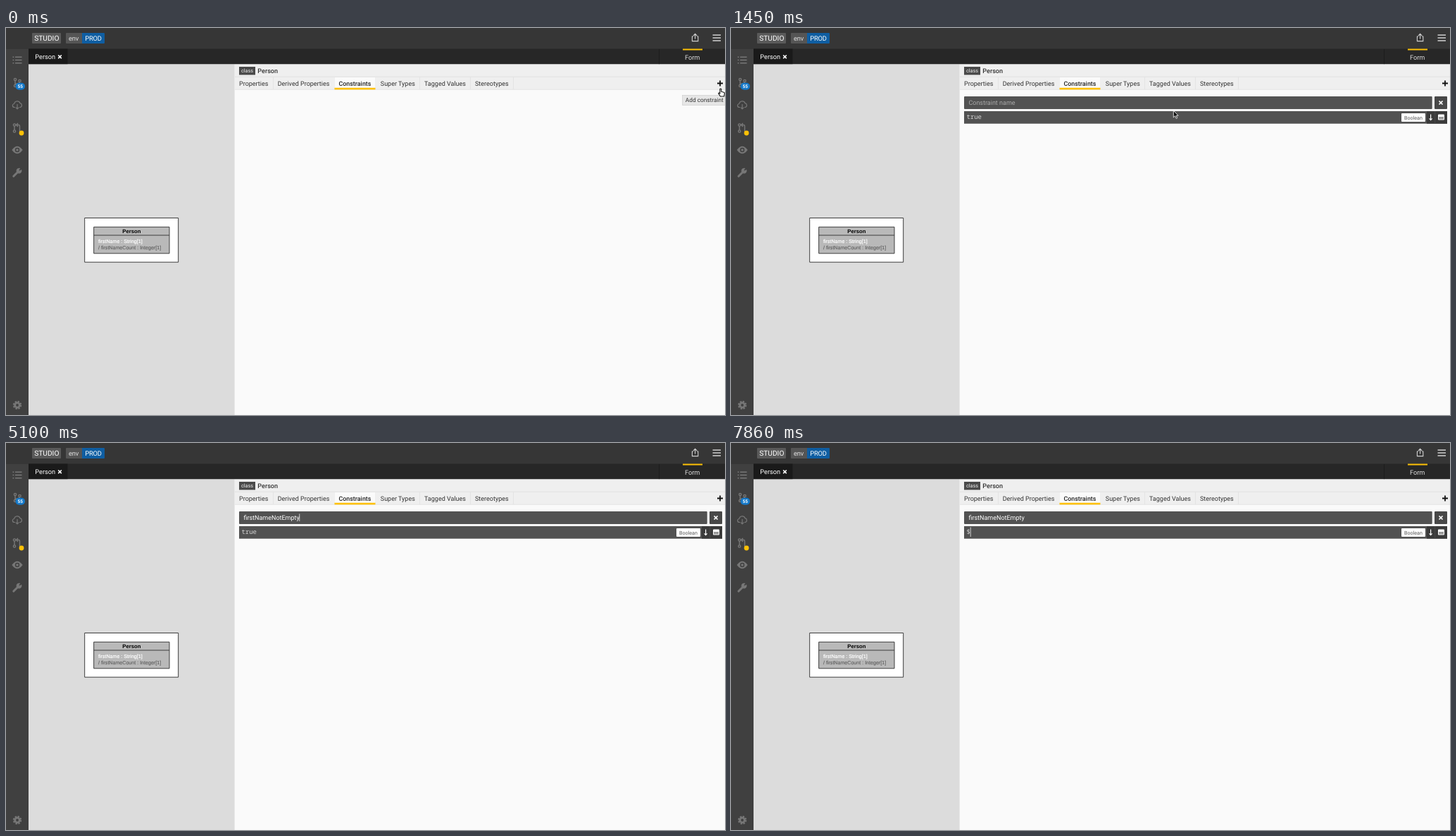
These frames come from a looping animation (1021x549 px, 8 s). An HTML page:

```html
<!DOCTYPE html>
<html lang="en">
<head>
<meta charset="utf-8">
<title>Model editor</title>
<style>
  html, body { margin: 0; width: 100%; height: 100%; overflow: hidden; background: #fafafa; }
  svg { display: block; font: 9px Roboto, sans-serif; text-rendering: geometricPrecision; }
  .medium { font-weight: 500; }
  .uml { font: 7.1px "Liberation Sans", Arial, sans-serif; stroke-width: .2; }
  .code { font: 9px "Noto Sans Mono", monospace; fill: #d4d4d4; }
  .line { fill: none; stroke: #777; stroke-width: 1.4; }
</style>
</head>
<body>
<svg width="1021" height="549" viewBox="0 0 1021 549">
  <!-- window bars -->
  <rect width="1021" height="30" fill="#363636"/>
  <rect x="32" y="29.5" width="989" height="22" fill="#272727"/>
  <rect x="32" y="29.5" width="55.5" height="22" fill="#1a1a1a"/>
  <path d="M927.5 30V51.5" stroke="#1c1c1c"/>
  <rect y="30" width="32" height="519" fill="#404040"/>
  <rect x="961" y="29.5" width="28" height="2" fill="#ffc107"/>
  <rect x="37" y="7" width="41" height="15" rx="1" fill="#5a5a5a"/>
  <path d="M86 7H108V22H86a1 1 0 0 1-1-1V8a1 1 0 0 1 1-1" fill="#555"/>
  <path d="M108 7H139a1 1 0 0 1 1 1V21a1 1 0 0 1-1 1H108z" fill="#0f5ea2"/>
  <g fill="#fff">
    <text x="40.2" y="18.2" font-size="10.2">STUDIO</text>
    <g font-size="9.4" letter-spacing="-.25">
      <text x="89" y="18" fill="#ddd">env</text>
      <text x="112.3" y="18">PROD</text>
    </g>
    <text x="41.3" y="44" font-size="9.2">Person</text>
    <text x="964" y="44.8" font-size="9.2" fill="#ddd">Form</text>
  </g>
  <path d="M74.2 38.5l4.6 4.6m0-4.6l-4.6 4.6" stroke="#fff" stroke-width="1.6"/>
  <g class="line" style="stroke:#d0d0d0">
    <path d="M976 12H974.4V18.6H982.8V12H981.2M978.6 15.5V8.5M976 11l2.6-2.7 2.6 2.7" stroke-width="1.1"/>
    <path d="M1003.5 10h11.5m-11.5 4h11.5m-11.5 4h11.5" stroke-width="1.7"/>
  </g>

  <!-- sidebar icons -->
  <g class="line">
    <path d="M13 41.3h9.5M13 45.5h9.5M13 49.7h9.5M9.5 41.3h1.8M9.5 45.5h1.8M9.5 49.7h1.8"/>
    <circle cx="13" cy="73" r="1.6"/><circle cx="19.5" cy="75" r="1.6"/><circle cx="13" cy="82" r="1.6"/>
    <path d="M13 74.5V80.5M19.5 76.5q0 2-6.5 3"/>
    <path d="M13 112.5H12a2.5 2.5 0 0 1-.3-5 4.3 4.3 0 0 1 8.3-.8 3 3 0 0 1 .3 5.8H19M16 108V115M13.8 112.7l2.2 2.3 2.2-2.3" stroke-width="1.2"/>
    <circle cx="12" cy="137.5" r="1.6"/><circle cx="12" cy="146.5" r="1.6"/>
    <path d="M12 139V145M15 137.5H18q1.5 0 1.5 2V147M17 135l-2.5 2.5 2.5 2.5"/>
    <path d="M9.3 173q6.7-9 13.4 0q-6.7 9-13.4 0z" fill="#777"/>
    <circle cx="16" cy="173" r="2.5" fill="#777" stroke="#404040"/>
    <path d="M10.8 210.3l6-6" stroke-width="3" stroke-linecap="round"/>
    <path d="M21.6 201.8a3.2 3.2 0 1 1-2.5-2.3l-1.6 2 1.8 1.8z" fill="#777"/>
    <circle cx="16" cy="535" r="5.2" stroke-dasharray="2.4 1.68" stroke-width="2"/>
    <circle cx="16" cy="535" r="3.3" stroke-width="2.8"/>
  </g>
  <rect x="13.5" y="77.8" width="13.5" height="10" rx="5" fill="#1478c8"/>
  <text x="20.2" y="85.3" font-size="6.5" font-weight="700" text-anchor="middle" fill="#fff">55</text>
  <circle cx="22" cy="149" r="3.4" fill="#ffc107"/>

  <!-- diagram -->
  <rect x="32" y="51.5" width="292" height="497.5" fill="#dcdcdc"/>
  <path d="M324.5 51.5V549" stroke="#e8e8e8"/>
  <g stroke="#3c3c3c">
    <path d="M111.7 269.5H244.7V332.2H111.7z" fill="#fff"/>
    <path d="M124.7 282.3H232V319.8H124.7zM124.7 294H232" fill="#b9b9b9"/>
  </g>
  <g class="uml">
    <text x="178.3" y="291.3" font-size="7.7" font-weight="700" text-anchor="middle">Person</text>
    <text x="131" y="304.5" fill="#fff" stroke="#fff">firstName : String[1]</text>
    <text x="131" y="313.5" fill="#686868" stroke="#686868">/ firstNameCount : Integer[1]</text>
  </g>

  <!-- form header -->
  <rect x="325" y="51.5" width="696" height="35.5" fill="#efefef"/>
  <path d="M325 69.2H1021M325 87.2H1021" stroke="#dedede" stroke-width=".8"/>
  <path d="M379.5 70V87M466.5 70V87M524.5 70V87M587.5 70V87M659.5 70V87M720.5 70V87" stroke="#e4e4e4"/>
  <rect x="466.5" y="70" width="58" height="17" fill="#fafafa"/>
  <rect x="466.5" y="84.8" width="58" height="2.6" fill="#ffc107"/>
  <rect x="331" y="55" width="23" height="11.5" fill="#4a4a4a"/>
  <text x="334" y="63.2" font-size="7.2" fill="#eee">class</text>
  <g fill="#333">
    <text class="medium" x="357.3" y="63.6" font-size="9.1">Person</text>
    <text x="331" y="81.6">Properties</text>
    <text x="385.7" y="81.6">Derived Properties</text>
    <text class="medium" x="472.5" y="81.6" font-size="8.9" fill="#222">Constraints</text>
    <text x="531.8" y="81.6">Super Types</text>
    <text x="594" y="81.6">Tagged Values</text>
    <text x="666" y="81.6">Stereotypes</text>
  </g>
  <path d="M1010 78.5h8m-4-4v8" stroke="#111" stroke-width="1.8"/>

  <!-- constraint editor -->
  <g id="form">
    <rect x="331" y="97" width="664.7" height="18" rx="1" fill="#525252"/>
    <rect x="999" y="97" width="18" height="18" rx="1" fill="#484848"/>
    <path d="M1005.5 103.5l5 5m0-5l-5 5" stroke="#fff" stroke-width="1.7"/>
    <rect x="331" y="118" width="686" height="17.7" fill="#525252"/>
    <rect x="988" y="118" width="29" height="17.7" fill="#3a3a3a"/>
    <path d="M999.7 118V135.7" stroke="#484848"/>
    <rect x="952" y="121" width="34" height="12" rx="1" fill="#fff"/>
    <text x="969" y="129.6" font-size="7.1" text-anchor="middle" fill="#555">Boolean</text>
    <path d="M993.6 122.5V130.5M991.6 128.3l2 2.3 2-2.3" class="line" style="stroke:#fff;stroke-width:1.2"/>
    <rect x="1004" y="122.5" width="9" height="8" rx="1" fill="#fff"/>
    <rect x="1005" y="126" width="7" height="3.5" fill="#999"/>
    <text id="name" x="337.4" y="109"></text>
    <text id="code" class="code" x="334.4" y="129.4"></text>
    <path id="caret" stroke="#eee" stroke-width=".8"/>
  </g>

  <g id="tooltip">
    <rect x="960.5" y="95.5" width="64" height="14" fill="#e6e6e6" stroke="#cfcfcf" stroke-width=".7"/>
    <text x="964.8" y="105.2" font-size="8.3" fill="#333">Add constraint</text>
  </g>
  <circle id="ring" fill="#fff" fill-opacity=".12" stroke="#aaa3df" stroke-width="2"/>

  <!-- pointers, each with its hot spot at 0,0 -->
  <g id="pointer">
    <path id="arrow" d="M0 0V9.6L2.3 7.5 3.9 11.1 5.4 10.4 3.9 7H6.8z" fill="#111" stroke="#fff" stroke-width=".8"/>
    <path id="hand" d="M-1.2 0.4q1.1-1 1.9.3V4.2l3.6 1q1.2.4 1 2L4.6 11H-.6L-3.3 6.8q.3-1.4 2.1.1z" fill="#fff" stroke="#111" stroke-width="1.1"/>
    <path id="beam" d="M-1.8-4.6Q0-4.6 0-3.4Q0-4.6 1.8-4.6M0-3.4V3.4M-1.8 4.6Q0 4.6 0 3.4Q0 4.6 1.8 4.6" fill="none" stroke="#f4f4f4"/>
  </g>
</svg>
<script>
const LOOP = 8000, STEP = 80, BLINK = 490, FADE = 480;
const $ = id => document.getElementById(id);
const show = (id, on) => $(id).setAttribute('visibility', on ? 'visible' : 'hidden');
const set = (id, attrs) => { for (const k in attrs) $(id).setAttribute(k, attrs[k]); };
const progress = (t, from, to) => Math.min(1, Math.max(0, (t - from) / (to - from)));
const ease = p => p * p * (3 - 2 * p);
const mix = (a, b, p) => a + (b - a) * p;
const count = (keys, t) => keys.filter(k => k <= t).length;

const NAME = 'firstNameNotEmpty';
const nameKeys = [2250, 2330, 2410, 2570, 2730, 2980, 3140, 3220, 3300,
                  3710, 3870, 3950, 4200, 4360, 4690, 5020, 5100];
const deleteKeys = [6640, 6800, 6960, 7120];
const DOLLAR = 7860;

// Pointer legs: start, end, from x, y, to x, y
const legs = [
  [570, 1210, 1015, 86, 635, 128],
  [1210, 1570, 635, 128, 626, 113.5],
  [5680, 6240, 611, 113, 551.3, 132]
];
// Clicks: press, release, x, y, ring radius
const clicks = [
  [410, 570, 1012, 82, 23.5],
  [1610, 1850, 626, 113.5, 13],
  [6240, 6480, 550.5, 131, 11.2]
];
const [, nameClick, codeClick] = clicks.map(c => c[0]);
const edits = [nameClick, ...nameKeys, codeClick, ...deleteKeys, DOLLAR];

function pointerKind(x, y) {
  if (x > 998) return 'hand';
  const inName = y > 97 && y < 115, inCode = y > 118 && y < 136;
  return inName || inCode ? 'beam' : 'arrow';
}

function drawPointer(t) {
  const [from, to, x0, y0, x1, y1] = legs.filter(l => l[0] <= t).pop() || legs[0];
  const p = ease(progress(t, from, to));
  const x = mix(x0, x1, p), y = mix(y0, y1, p);
  // Typing hides the pointer until it moves again
  const visible = t < 2170 || (t >= 5760 && t < deleteKeys[0]);
  set('pointer', { transform: `translate(${x} ${y})` });
  for (const kind of ['arrow', 'hand', 'beam']) show(kind, visible && kind === pointerKind(x, y));
}

function drawRing(t) {
  const click = clicks.find(c => t >= c[0] && t < c[1] + FADE);
  show('ring', click);
  if (!click) return;
  const [press, release, cx, cy, radius] = click;
  const grow = progress(t, press, press + STEP), fade = progress(t, release, release + FADE);
  const r = radius * mix(.5, 1, grow) * mix(1, .65, fade);
  set('ring', { cx, cy, r, opacity: 1 - fade });
}

function drawForm(t) {
  const typed = count(nameKeys, t), left = 4 - count(deleteKeys, t);
  const name = $('name'), code = $('code');
  name.textContent = typed ? NAME.slice(0, typed) : 'Constraint name';
  name.setAttribute('fill', typed ? '#fff' : '#aaa');
  code.textContent = t >= DOLLAR ? '$' : 'true'.slice(0, left);

  const lastEdit = edits[count(edits, t) - 1];
  show('caret', lastEdit && (t - lastEdit) % (2 * BLINK) < BLINK);
  const x = t >= codeClick
    ? 334.8 + 5.4 * code.textContent.length
    : 337.4 + (typed ? name.getComputedTextLength() : 0);
  set('caret', { d: t >= codeClick ? `M${x} 119.5V133` : `M${x} 100.5V111` });
}

function draw(now) {
  const t = now % LOOP;
  const base = t < 5000 ? 410 : 5760;
  const stepped = Math.floor((t - base) / STEP) * STEP + base;
  const open = t >= 570;
  $('form').style.display = open ? '' : 'none';
  show('tooltip', t < 410);
  show('caret', false);
  if (open) drawForm(t);
  drawRing(stepped);
  drawPointer(stepped);
  requestAnimationFrame(draw);
}
requestAnimationFrame(draw);
</script>
</body>
</html>
```
